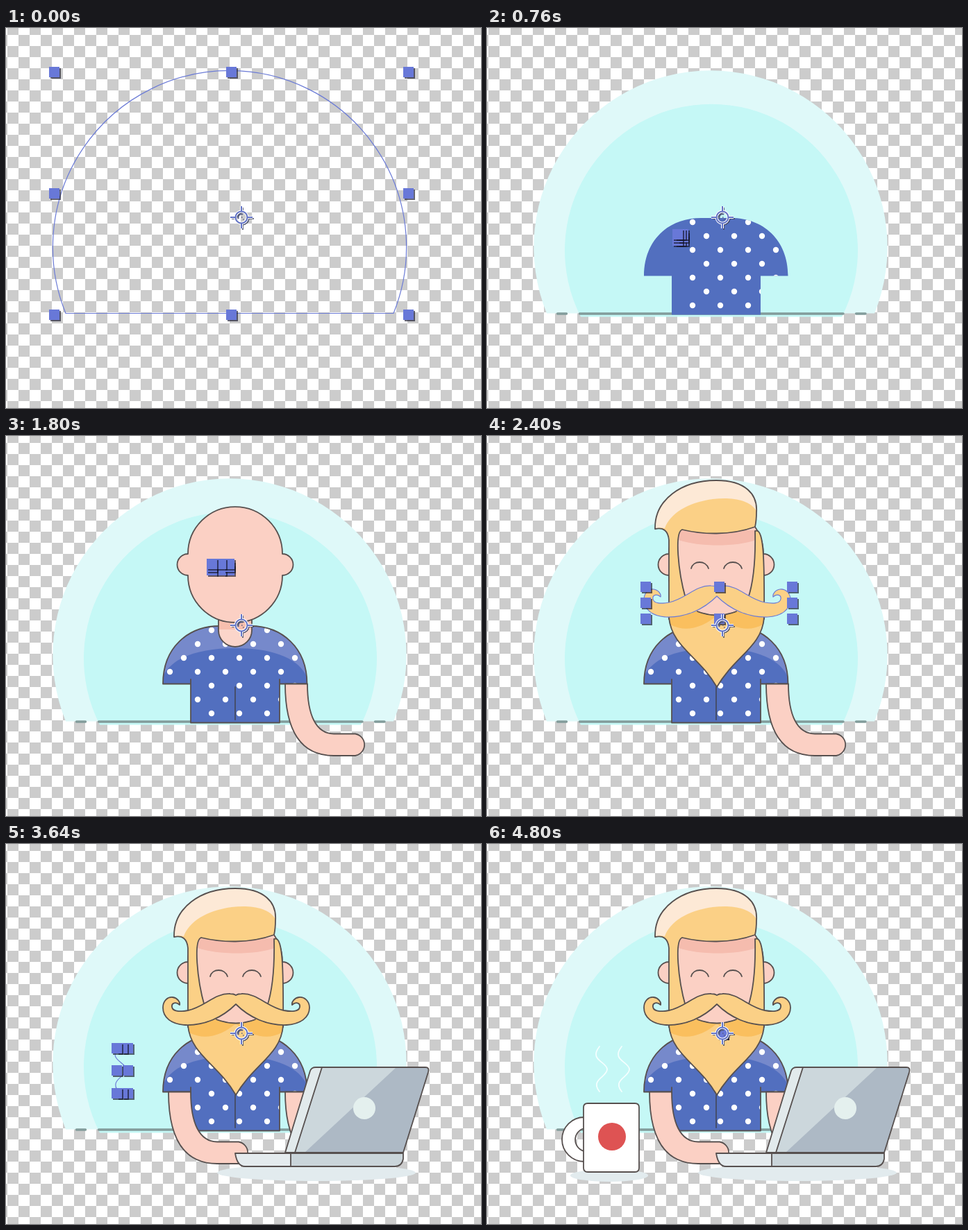
Write an HTML page that moves like this. It is 684 px wide and 548 px high and loops after 4840 ms.

```html
<!DOCTYPE html>
<html lang="en">
<head>
<meta charset="utf-8">
<title>Layer by layer</title>
<style>
  html, body { margin: 0; width: 100%; height: 100%; overflow: hidden; background: #fff; }
  svg { display: block; width: 684px; height: 548px; }
  .off { display: none; }
  .sel { fill: none; stroke: #6b7bd6; stroke-width: 1.2; }
</style>
</head>
<body>
<svg viewBox="0 0 684 548">
  <defs>
    <pattern id="check" x="2" y="10" width="32" height="32" patternUnits="userSpaceOnUse">
      <path d="M16 0h16v16h-16zM0 16h16v16h-16z" fill="#ccc" shape-rendering="crispEdges"/>
    </pattern>
    <clipPath id="shirtClip"><path id="shirtClipPath"/></clipPath>
    <g id="cross"><circle r="8.5"/><path d="M0-16V-9M0 9V16M-16 0H-9M9 0H16"/></g>
  </defs>
  <rect width="684" height="548" fill="url(#check)"/>
  <g id="art"></g>
  <g id="handles"></g>
  <g fill="none" transform="translate(339 273)">
    <use href="#cross" x="2" y="2" stroke="#444a66" stroke-width="1.6"/>
    <use href="#cross" stroke="#fff" stroke-width="4"/>
    <use href="#cross" stroke="#6172c4" stroke-width="2"/>
    <path d="M-4 2A4.5 4.5 0 0 1 2-4M0 0h1.5M2 3h1.5" stroke="#555c80" stroke-width="1.6"/>
  </g>
</svg>
<script>
const NS = 'http://www.w3.org/2000/svg';
const STEP = 40, STEPS = 121;
const INK = '#57504f', SKIN = '#fbd0c4', HAIR = '#fbd086', PALE = '#e2ebee';
const $ = id => document.getElementById(id);

function make(tag, attrs, parent) {
  const el = document.createElementNS(NS, tag);
  for (const k in attrs) el.setAttribute(k, attrs[k]);
  parent.appendChild(el);
  return el;
}

const layers = [];

// A layer is outlined and framed during its first step, then painted.
function layer(start, d, attrs, pick = true) {
  const el = make('path', { d, fill: 'none', 'stroke-linecap': 'round', 'stroke-linejoin': 'round', ...attrs }, $('art'));
  layers.push({ el, start, pick, box: el.getBBox() });
}
const fill = (start, d, color, pick) => layer(start, d, { fill: color }, pick);
const line = (start, d, pick, color = INK, width = 1.8) =>
  layer(start, d, { stroke: color, 'stroke-width': width }, pick);
const oval = (x, y, rx, ry = rx) =>
  `M${x - rx} ${y}a${rx} ${ry} 0 1 1 ${2 * rx} 0a${rx} ${ry} 0 1 1 ${-2 * rx} 0z`;

// Backdrop
fill(0, 'M86 411.5A254.6 254.6 0 1 1 558 411.5Z', '#dff9f9');
fill(2, 'M135 416.5A211 211 0 1 1 511 416.5Z', '#c5f8f6');
line(4, 'M101.5 412H114.5M133.5 412H513M531.5 412H545', true, '#829c9b', 3.4);

// Shirt
const shirt = 'M226 357.5C226 305 262 274 308 274H352C397 274 433.5 305 433.5 357.5H394V413.5H266V357.5Z';
$('shirtClipPath').setAttribute('d', shirt);
fill(6, shirt, '#526fbf');
fill(24, 'M227 345C231 300 268 274 308 274H352C392 274 428 300 432 345C418 318 380 306 330 306C280 306 241 318 227 345Z', '#7689cb', false);
const firstY = [320, 300, 280, 300, 320, 300, 280, 300, 320, 340];
const lastY = [360, 380, 400, 380, 400, 380, 400, 380, 320, 340];
let n = 0;
firstY.forEach((y0, col) => {
  for (let y = y0; y <= lastY[col]; y += 40, n++)
    layer(8 + ((n + 1) >> 1), oval(416 - col * 20, y, 4.2), { fill: '#fff', 'clip-path': 'url(#shirtClip)' }, n % 2 === 0);
});
line(26, shirt + 'M266 357V351M394 357V351', false);
line(27, 'M330 362V409', false, '#454b62');

// Right arm
const arm = x => `M${x} 357.5C${x} 430 ${x + 26} 461 ${x + 70} 461H${x + 101}A16 16 0 0 0 ${x + 101} 429.5H${x + 70}C${x + 44} 429 ${x + 32} 402 ${x + 32} 357.5Z`;
fill(30, arm(402), SKIN);
line(32, arm(402));

// Neck and head
const neck = 'M306 256V280A24 24 0 0 0 354 280V256';
fill(34, neck, '#fbd5ca');
fill(35, 'M306 256H354V279H306Z', '#f7bfae');
line(37, neck);
const head = 'M262 170A68 68 0 0 1 398 170A15.5 15.5 0 0 1 398 201A68 68 0 0 1 262 201A15.5 15.5 0 0 1 262 170Z';
fill(39, head, SKIN);
line(41, head);
line(45, 'M294 191C297 179 315 179 319 191');
line(46, 'M341 191C345 179 363 179 367 191');

// Hair and beard
fill(47, 'M276 136H387V150C360 160 305 160 276 150Z', '#f5bcae');
const quiff = 'M242 134C241 92 280 64 330 64C372 64 390 84 388 110Q388 122 386 131C350 144 310 142 281 135';
const burns = 'C270 139 275 195 286 234M386 137C397 133 400 160 399 264';
fill(48, quiff + 'C270 139 275 195 287 234L262 264V148Q260 131 242 134Z', HAIR);
fill(49, 'M386 137C397 133 400 160 399 264L376 238C384 210 387 180 386 137Z', HAIR);
fill(50, 'M242 134C241 92 280 64 330 64C372 64 389 83 388 108C378 91 350 88 325 91C288 96 264 112 256 133Q248 131 242 134Z', '#fde9d6');
const beard = 'M262 262C266 304 306 318 331 362C356 318 396 304 399 262';
fill(51, beard + 'L376 238H286Z', HAIR);
fill(52, 'M262 262L286 238H376L399 262L397 272C376 284 351 276 331 259C311 276 286 284 264 272Z', '#fabf5e');
fill(53, 'M302 252Q331 264 360 252L331 225Z', SKIN);
line(54, quiff + burns + 'M242 134Q260 130 262 150V264M386 137C387 180 384 210 376 234');
line(56, beard);
line(57, 'M303 253Q331 264 359 253');

// Moustache
const tache = 'M331 231C312 250 286 262 258 261C238 260 226 250 226 236C226 226 233 220 240 221C247 222 251 228 250 232C245 227 238 229 239 235C240 242 251 242 262 240C286 235 300 215 323 216Q328 216 331 218' +
  'Q334 216 339 216C362 215 376 235 400 240C411 242 422 242 423 235C424 229 417 227 412 232C411 228 415 222 422 221C429 220 437 226 437 236C437 250 424 260 404 261C376 262 350 250 331 231Z';
fill(58, tache, HAIR);
line(60, tache);

// Left arm
fill(62, arm(234), SKIN);
line(63, arm(234));

// Laptop
fill(65, oval(447, 474, 143, 12), PALE, false);
fill(67, 'M402 445L438 327Q440 322 446 322H457L417 445Z', '#e2eaec');
line(69, 'M417 445H402L438 327Q440 322 446 322H457');
const screen = 'M455 322H604Q610 322 608 329L572 445H416Z';
fill(74, screen, '#ccd7dc');
fill(76, 'M562 322H604Q610 322 608 329L572 445H430Z', '#adb9c5');
const base = 'M330 446H572V454Q570 465 560 465H344Q333 465 330 446Z';
fill(78, base, '#e4ebee');
fill(79, 'M410 446H572V454Q570 465 560 465H410Z', '#cad5da');
line(81, screen);
fill(83, oval(516, 381, 16), '#e4f0ee');
line(84, base + 'M410 446V465');

// Mug
const steam = x => `M${x} 292C${x - 16} 312 ${x + 11} 314 ${x + 11} 325C${x + 11} 336 ${x - 14} 340 ${x} 357`;
line(91, steam(162), true, '#f4ffff');
line(93, steam(194), true, '#f4ffff');
fill(96, oval(176, 478, 56, 9), PALE, false);
const grip = 'M140 394A32 32 0 0 0 140 458V443A17 17 0 0 1 140 410Z';
fill(98, grip, '#fff');
line(100, grip);
const mug = 'M145 374H213Q219 374 219 380V467Q219 473 213 473H145Q139 473 139 467V380Q139 374 145 374Z';
fill(103, mug, '#fff');
line(106, mug);
fill(117, oval(180, 422, 20), '#de5353');

// Empty layers leave only a handle at the centre.
const emptyBox = { x: 337, y: 271, width: 0, height: 0 };
const isEmpty = f => f === 71 || f === 72 || f === 120;

// Stacked from bottom right up to top left.
const spots = [[2, 2], [1, 2], [0, 2], [2, 1], [0, 1], [2, 0], [1, 0], [0, 0]];
const handles = spots.map(() => {
  const g = make('g', { 'shape-rendering': 'crispEdges' }, $('handles'));
  make('rect', { x: -5, y: -5, width: 15, height: 15, fill: '#14142a', opacity: .65 }, g);
  make('rect', { x: -7, y: -7, width: 15, height: 15, fill: '#6878d8' }, g);
  return g;
});

function place(box) {
  $('handles').classList.toggle('off', !box);
  if (!box) return;
  handles.forEach((g, i) => {
    const x = Math.round(box.x + box.width * spots[i][0] / 2 + 2);
    const y = Math.round(box.y + box.height * spots[i][1] / 2 + 1.5);
    g.setAttribute('transform', `translate(${x} ${y})`);
  });
}

let shown = -1;
function draw(now) {
  const f = Math.floor(now / STEP) % STEPS;
  if (f === shown) return;
  shown = f;
  let box = isEmpty(f) ? emptyBox : null;
  for (const l of layers) {
    const picked = l.pick && l.start === f;
    l.el.classList.toggle('off', l.start > f);
    l.el.classList.toggle('sel', picked);
    if (picked) box = l.box;
  }
  place(box);
}

const t0 = performance.now();
function tick() {
  draw(performance.now() - t0);
  requestAnimationFrame(tick);
}
tick();
</script>
</body>
</html>
```
